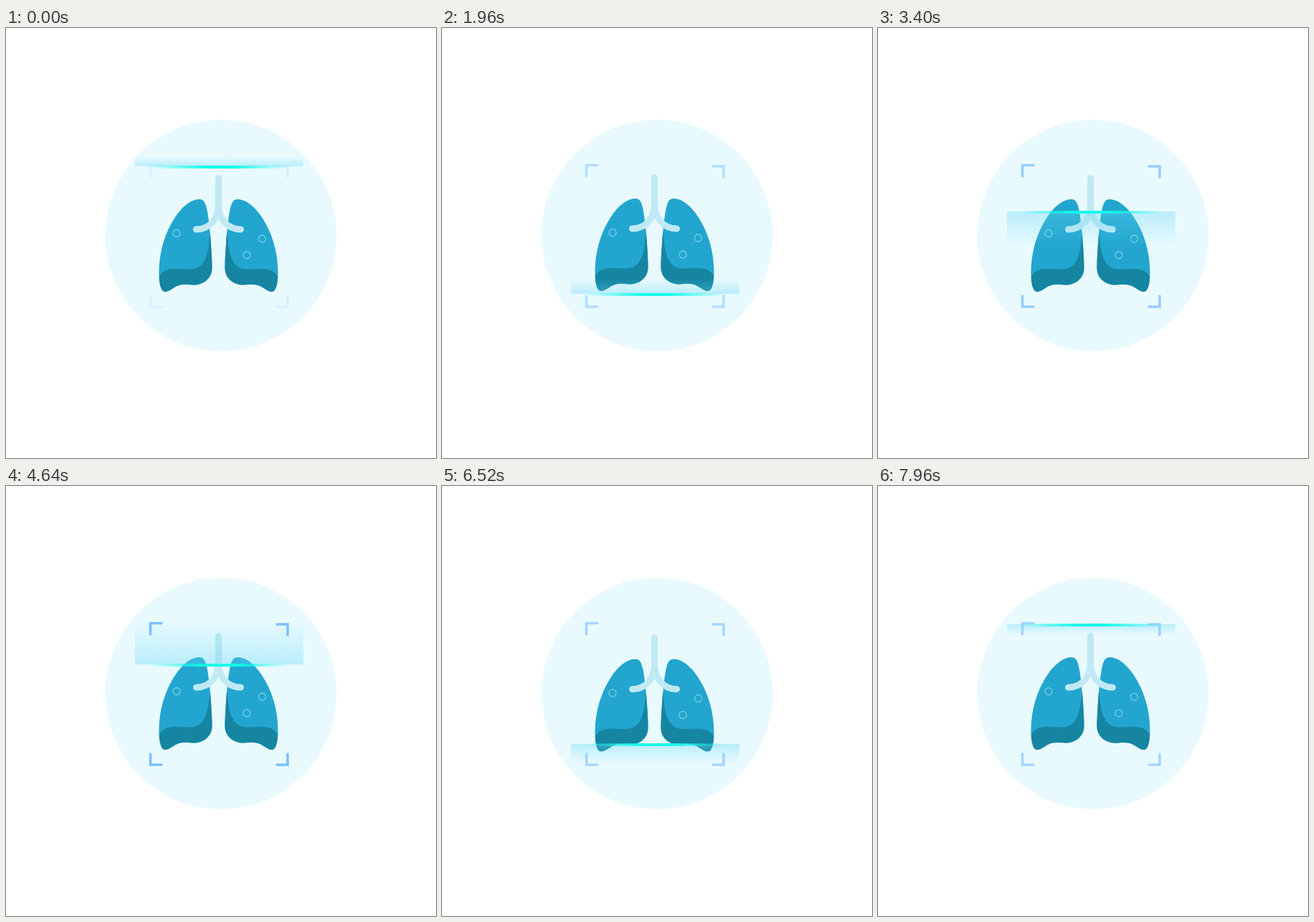
Write an HTML page that moves like this. It is 600 by 600 pixels and loops after 8000 ms.

```html
<!DOCTYPE html>
<html>
<head>
<meta charset="utf-8">
<style>
html, body { margin: 0; width: 100%; height: 100%; overflow: hidden; background: #fff; }
svg { display: block; width: 600px; height: 600px; }
</style>
</head>
<body>
<svg viewBox="0 0 600 600">
  <defs>
    <linearGradient id="glow" x1="0" y1="0" x2="0" y2="1">
      <stop offset="0" stop-color="#64d7f4" stop-opacity="0"/>
      <stop offset="1" stop-color="#64d7f4" stop-opacity=".36"/>
    </linearGradient>
    <linearGradient id="beam">
      <stop offset=".08" stop-color="#14fbea" stop-opacity="0"/>
      <stop offset=".42" stop-color="#14fbea"/>
      <stop offset=".58" stop-color="#14fbea"/>
      <stop offset=".92" stop-color="#14fbea" stop-opacity="0"/>
    </linearGradient>
    <path id="shape" d="M270 239C277 239 279 246 281 256C283 268 285 285 286 302C287 318 287.5 325 287.5 335
      C287.5 349 276 358.5 262 358.5C255 358.5 250 357 243 358.5C234 360.5 229 368 222 368
      C215 368 213.5 352 213.5 341C213.5 312 222 285 236 264C246 249 258 239 270 239Z"/>
    <clipPath id="inside"><use href="#shape"/></clipPath>
    <g id="lung">
      <use href="#shape" fill="#22a6cf"/>
      <path clip-path="url(#inside)" fill="#1585a1" d="M213 348C217 340 224 336 236 336C245 336 250 337 258 336.5
        C274 336 280 322 282.5 305C283.5 298 284 290 285 285H300V380H205Z"/>
    </g>
  </defs>

  <circle cx="300" cy="289.5" r="161.5" fill="#e9faff"/>

  <g id="lungs" fill="none">
    <use href="#lung"/>
    <use href="#lung" transform="translate(593) scale(-1 1)"/>
    <path stroke="#c0e9f4" stroke-width="9" stroke-linecap="round"
      d="M296.5 209.5V246C296.5 265 285 281 265.5 281M296.5 246C296.5 265 308 281 327.5 281"/>
    <g stroke="#c0e9f4" stroke-opacity=".55" stroke-width="1.3">
      <circle cx="238" cy="286.5" r="5"/>
      <circle cx="357.5" cy="294" r="5"/>
      <circle cx="336" cy="317" r="5"/>
    </g>
  </g>

  <path id="corners" fill="none" stroke="#70b9ff" stroke-width="3.6" stroke-linecap="round"
    d="M201.5 207V191.5H217M378 193H393V208M201.5 374V389H217M378 389H393V374"/>

  <rect id="trail" x="180" width="235" height="1" fill="url(#glow)"/>
  <rect id="line" x="180" width="235" height="4" fill="url(#beam)"/>
</svg>
<script>
const el = id => document.getElementById(id);

// Smooth curve through [time, value] points that never overshoots them
function curve(keys, t) {
  const slope = i => keys[i] && keys[i + 1]
    ? (keys[i + 1][1] - keys[i][1]) / (keys[i + 1][0] - keys[i][0]) : 0;
  const tangent = i => {
    const a = slope(i - 1), b = slope(i);
    if (i === 0) return b;
    if (i === keys.length - 1) return a;
    return a * b > 0 ? 2 * a * b / (a + b) : 0;
  };
  let i = 0;
  while (i < keys.length - 2 && t >= keys[i + 1][0]) i++;
  const [t0, v0] = keys[i], [t1, v1] = keys[i + 1];
  const d = t1 - t0, u = (t - t0) / d, w = 1 - u;
  return v0 * (1 + 2 * u) * w * w + v1 * u * u * (3 - 2 * u)
    + d * u * w * (tangent(i) * w - tangent(i + 1) * u);
}

const LOOP = 8000, SWEEP = 4000, STEP = 40, TURN = 2060;
const scanY = [[0, 194], [640, 250], [1280, 322], [1660, 360], [TURN, 373],
  [2520, 361], [2640, 353], [3400, 257], [3960, 194], [4000, 194]];
const trailDown = [[0, 14], [640, 62], [1100, 76], [1280, 75], [TURN, 12]];
const trailUp = [[TURN, 10], [2520, 27], [2640, 40], [3000, 74], [3400, 50], [4000, 12]];
const lungY = [[0, 0], [1300, -2], [2640, 0], [4640, 0], [6520, 2.4], [8000, 0]];
const cornerAlpha = [[0, .15], [2640, .55], [5000, .9], [6520, .56], [7240, .47], [8000, .56]];

function draw(now) {
  const t = Math.floor(now % LOOP / STEP) * STEP;
  const s = t % SWEEP, y = curve(scanY, s);
  const height = s < TURN ? -curve(trailDown, s) : curve(trailUp, s);
  el('lungs').setAttribute('transform', `translate(0 ${curve(lungY, t)})`);
  el('corners').setAttribute('opacity', curve(cornerAlpha, t));
  el('line').setAttribute('y', y - 2);
  // The trail's strong edge sits on the line, its faint edge behind it
  el('trail').setAttribute('transform', `translate(0 ${y - 1 + height}) scale(1 ${-height})`);
}

const start = performance.now();
function tick() {
  draw(performance.now() - start);
  requestAnimationFrame(tick);
}
tick();
</script>
</body>
</html>
```
